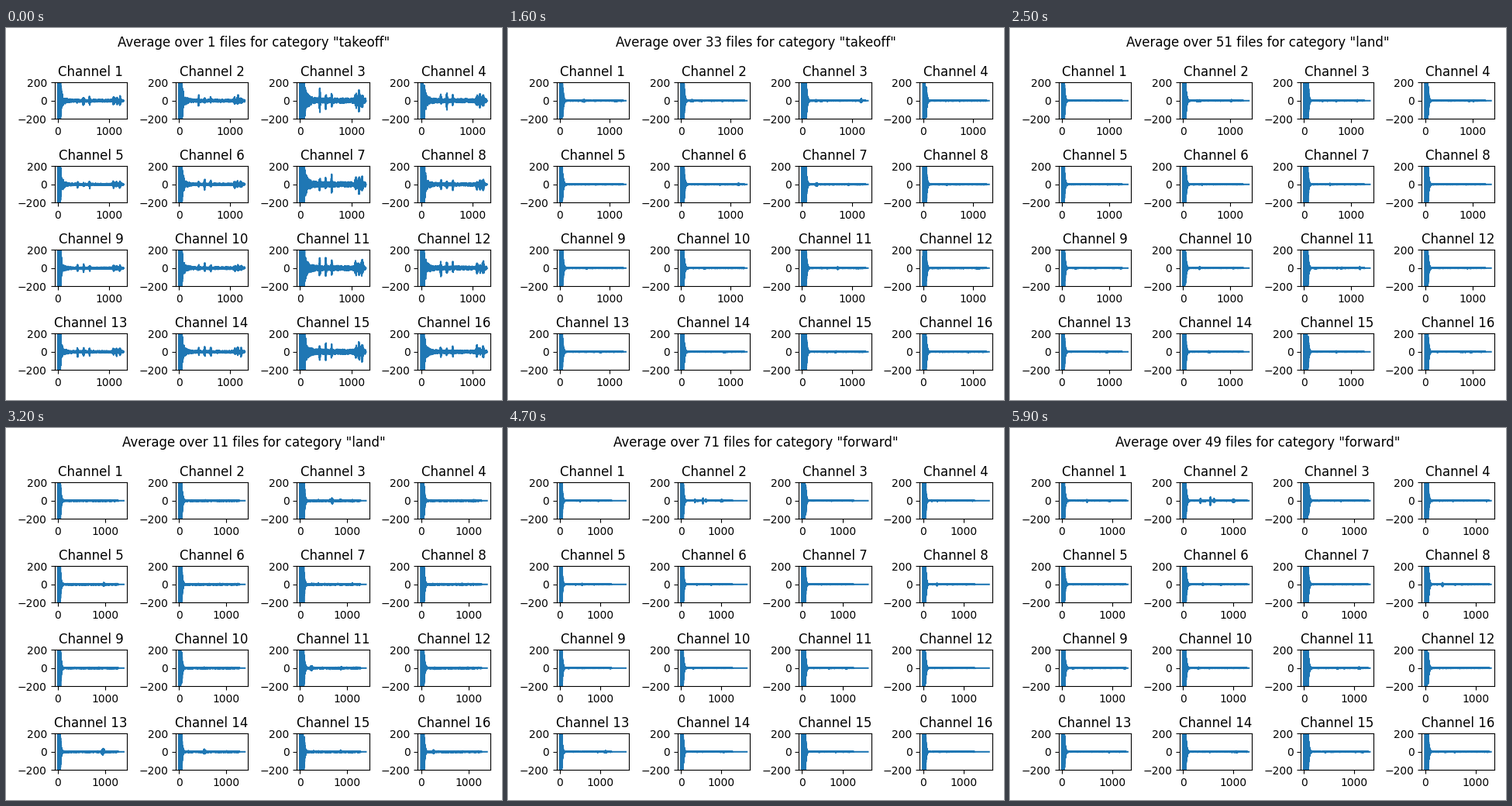
Write a matplotlib script that moves like this. It is 640 px wide and 480 px high and loops after 6000 ms.

```python
import numpy as np
import matplotlib.pyplot as plt
from matplotlib.animation import FuncAnimation

W, H, DPI = 640, 480, 100
ROWS = COLS = 4
CHANNELS = ROWS * COLS
FILES, SAMPLES = 91, 1280
CATEGORIES = ["takeoff", "land", "forward"]
COUNTS = [1 + 10 * j for j in range(10)] + [1 + 16 * j // 3 for j in range(10)]

# Longest recording of each category: its index and length
LONGEST = [(8, 1326), (8, 1395), (50, 1630)]

# Lasting spikes: category, channel, time, height summed over recordings
SPIKES = [(0, 3, 1190, 800), (2, 2, 350, 1500), (2, 2, 545, 2600),
          (2, 2, 615, 1500), (2, 8, 345, 1200), (2, 1, 500, 900)]
SPIKE_FILE = 20

rng = np.random.default_rng(7)
t = np.arange(SAMPLES)

# The third column of electrodes rings longest and is the noisiest
ring_end = np.tile([52, 56, 84, 60], ROWS) + rng.uniform(-5, 5, CHANNELS)
burst_size = np.tile([45, 52, 105, 72], ROWS) * rng.uniform(0.85, 1.15, CHANNELS)


def bump(center, width):
    return np.exp(-((t - center) / width) ** 2)


def decay(start, tau):
    return np.exp(-np.maximum(t - start, 0) / tau)


def ringing(end):
    """Start-up transient shared by every recording of a category."""
    env = np.minimum(200 * np.exp((end - t) / 16), 900) + 40 * decay(end, 25)
    if rng.random() < 0.2:
        env *= 1 - 0.88 * bump(end - 14, 10)
    wave = np.sin(2 * np.pi * t / 4.3 + rng.uniform(0, 6))
    return env * wave * rng.uniform(0.75, 1, SAMPLES)


def first_recording(cat):
    """Noise, slow start-up tail and bursts that all channels share."""
    if cat == 0:
        early, late = 385 + 117 * np.arange(3), 1090 + 60 * np.arange(3)
    else:
        early, late = rng.uniform(250, 800, 3), rng.uniform(850, 1250, 3)
    env = []
    for end, size in zip(ring_end, burst_size):
        e = size / 8 + (20 + size / 3) * decay(end, 70)
        for time in early:
            e += 0.5 * size * rng.uniform(0.5, 1.1) * bump(time, 10)
        for time in late:
            e += 0.5 * size * rng.uniform(0.4, 1) * bump(time, 18)
        env.append(e)
    return np.array(env) * rng.normal(0, 1, (CHANNELS, SAMPLES)).clip(-2, 2)


def recordings(cat):
    """Running sums over the recordings, without the shared ringing."""
    data = rng.normal(0, 10, (FILES, CHANNELS, SAMPLES))
    data[0] = first_recording(cat)
    for i in range(1, FILES):
        for _ in range(2):
            shape = bump(rng.uniform(200, 1250), rng.uniform(8, 40))
            height = rng.exponential(170)
            data[i, rng.integers(CHANNELS)] += height * shape * rng.uniform(-1, 1, SAMPLES)
    for c, ch, time, height in SPIKES:
        if c == cat:
            data[SPIKE_FILE, ch - 1] += height * bump(time, 12) * rng.uniform(-1, 1, SAMPLES)
    return np.cumsum(data, axis=0)


def length(cat, n):
    """Longest recording among the first n."""
    index, longest = LONGEST[cat]
    if n > index:
        return longest
    return 1308 if n > 1 else 1286


rings = [np.array([ringing(end) for end in ring_end]) for _ in CATEGORIES]
sums = [recordings(cat) for cat in range(len(CATEGORIES))]

fig, axes = plt.subplots(ROWS, COLS, figsize=(W / DPI, H / DPI), dpi=DPI)
axes = axes.ravel()
heading = fig.suptitle("")
lines = []
for i, ax in enumerate(axes):
    ax.set_title(f"Channel {i + 1}")
    ax.set_ylim(-200, 200)
    ax.set_yticks([-200, 0, 200])
    ax.set_xticks([0, 1000])
    lines += ax.plot([], [], color="#1f77b4", lw=1.5)


def draw(frame):
    cat, step = divmod(frame, len(COUNTS))
    n = COUNTS[step]
    size = length(cat, n)
    mean = np.zeros((CHANNELS, size))
    mean[:, :SAMPLES] = rings[cat] + sums[cat][n - 1] / n
    heading.set_text(f'Average over {n} files for category "{CATEGORIES[cat]}"')
    x = np.arange(size)
    for ax, line, y in zip(axes, lines, mean):
        line.set_data(x, y)
        ax.set_xlim(-0.05 * size, 1.05 * size)
    return lines


draw(0)
fig.tight_layout()
anim = FuncAnimation(fig, draw, frames=len(CATEGORIES) * len(COUNTS),
                     init_func=lambda: lines, interval=100,
                     repeat=True, repeat_delay=0)
plt.show()
```
